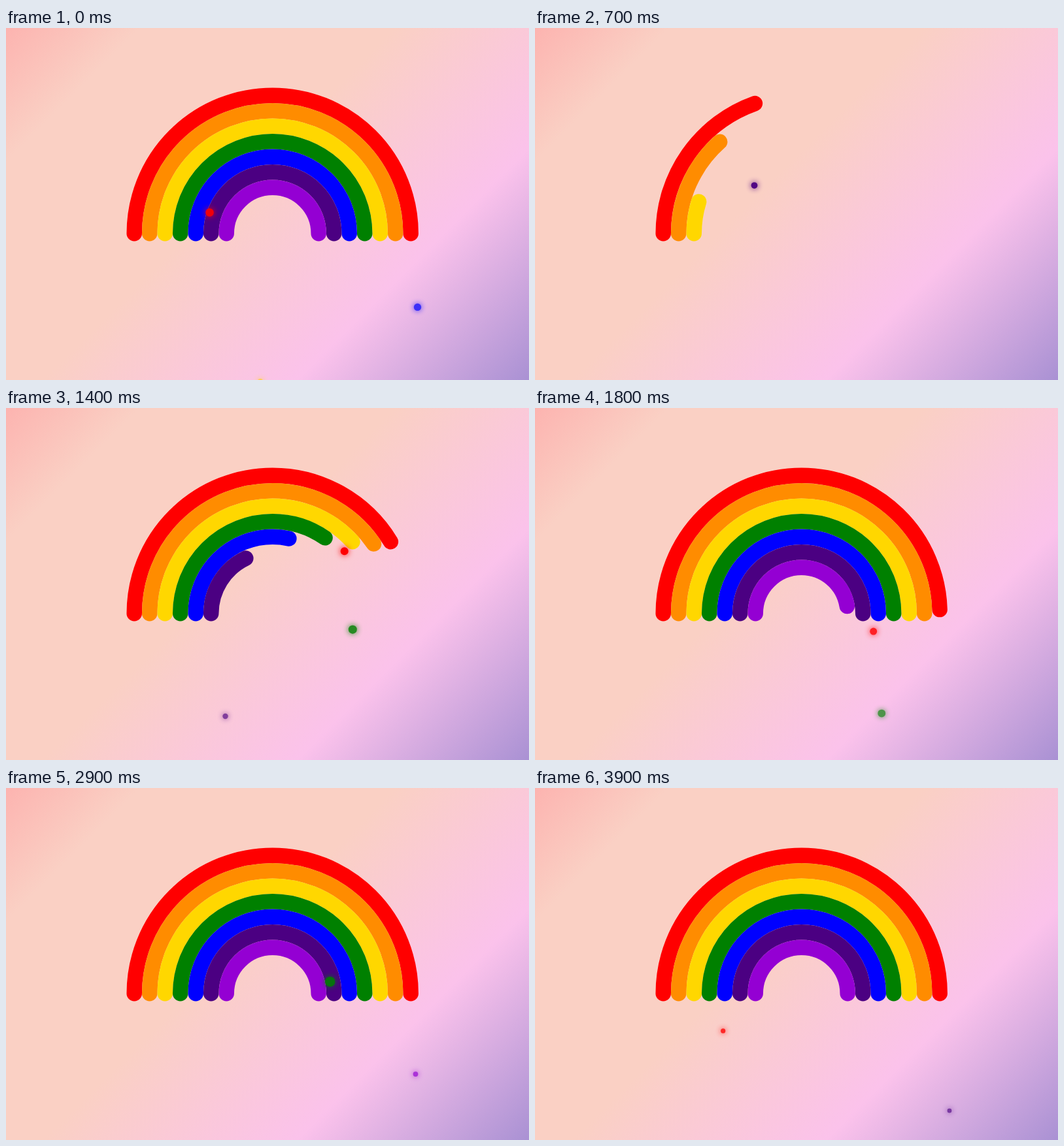
Write an HTML page that moves like this. It is 800 by 539 pixels and loops after 4000 ms.

```html
<!DOCTYPE html>
<html lang="en">
<head>
<meta charset="utf-8">
<title>Rainbow and falling sparks</title>
<style>
  html, body { margin: 0; width: 100%; height: 100%; overflow: hidden; }
  #stage {
    position: relative;
    width: 800px;
    height: 539px;
    overflow: hidden;
    background: linear-gradient(135deg,
      #ff9a9e -131px, #fad0c4 145px, #fad0c4 421px, #fbc2eb 696px, #a18cd1 972px);
  }
  svg { position: absolute; left: 0; top: 0; }
  path { fill: none; stroke-width: 10; stroke-linecap: round; stroke-dasharray: 300; }
  .drop {
    position: absolute;
    left: 0;
    top: 0;
    border-radius: 50%;
    background: currentColor;
    box-shadow: 0 0 10px currentColor;
  }
</style>
</head>
<body>
<div id="stage">
  <svg width="800" height="539"><g id="bow" transform="translate(407.7 314.7) scale(2.35)"></g></svg>
</div>
<script>
  const LOOP = 4000, STEP = 100;
  const RESET = 100;                    // the old bow and its drops vanish here
  const DRAW_START = 215, STAGGER = 200, DRAW_TIME = 2000, DASH = 300;
  const DROP_TOP = 215;

  const [red, orange, yellow, green, blue, indigo, violet] = colors =
    ['#ff0000', '#ff8c00', '#ffd700', '#008000', '#0000ff', '#4b0082', '#9400d3'];

  // start ms, x, colour, diameter, speed in px/s
  const drops = [
    [-1003, 388.5, yellow, 11, 325],
    [-652, 629, blue, 13, 325],
    [-206, 311, red, 12.5, 325],
    [621, 335.5, indigo, 10.2, 330],
    [1013, 530.3, green, 13.5, 321],
    [1386, 517.7, red, 12, 307],
    [1809, 491.5, orange, 14, 325],
    [2215, 626, violet, 9, 325],
    [2649, 495.7, green, 15.5, 325],
    [3079, 634, indigo, 7.8, 340],
    [3417, 287.7, red, 8, 325]
  ].map(([start, x, color, size, speed]) => {
    const el = document.createElement('div');
    el.className = 'drop';
    el.style.cssText = `color:${color};width:${size}px;height:${size}px;margin:${-size / 2}px`;
    stage.append(el);
    return { el, start, x, speed };
  });

  const stripes = colors.map((color, i) => {
    const r = 90 - 10 * i;
    const path = document.createElementNS('http://www.w3.org/2000/svg', 'path');
    path.setAttribute('d', `M${-r} 0A${r} ${r} 0 0 1 ${r} 0`);
    path.setAttribute('stroke', color);
    bow.append(path);
    return path;
  });

  // cubic-bezier(0, 0, .58, 1)
  function easeOut(x) {
    if (x <= 0) return 0;
    if (x >= 1) return 1;
    let lo = 0, hi = 1;
    for (let i = 0; i < 30; i++) {
      const s = (lo + hi) / 2;
      if (1.74 * s * s - 0.74 * s ** 3 < x) lo = s; else hi = s;
    }
    return lo * lo * (3 - 2 * lo);
  }

  function render(t) {
    stripes.forEach((path, i) => {
      const p = t < RESET ? 1 : easeOut((t - DRAW_START - STAGGER * i) / DRAW_TIME);
      path.style.strokeDashoffset = DASH * (1 - p);
      path.style.visibility = p > 0 ? 'visible' : 'hidden';
    });
    for (const { el, start, x, speed } of drops) {
      const age = (t - start) / 1000;
      const y = DROP_TOP + speed * age;
      const live = age >= 0 && y < 560 && (start > 0 || t < RESET);
      el.style.visibility = live ? 'visible' : 'hidden';
      if (!live) continue;
      el.style.opacity = 1 - 0.4 * age;
      el.style.transform = `translate(${x}px, ${y}px) scale(${1 - 0.2 * age})`;
    }
  }

  // The picture moves at ten steps a second.
  function tick(now) {
    render(Math.floor((now + 8) / STEP) * STEP % LOOP);
    requestAnimationFrame(tick);
  }
  render(0);
  requestAnimationFrame(tick);
</script>
</body>
</html>
```
